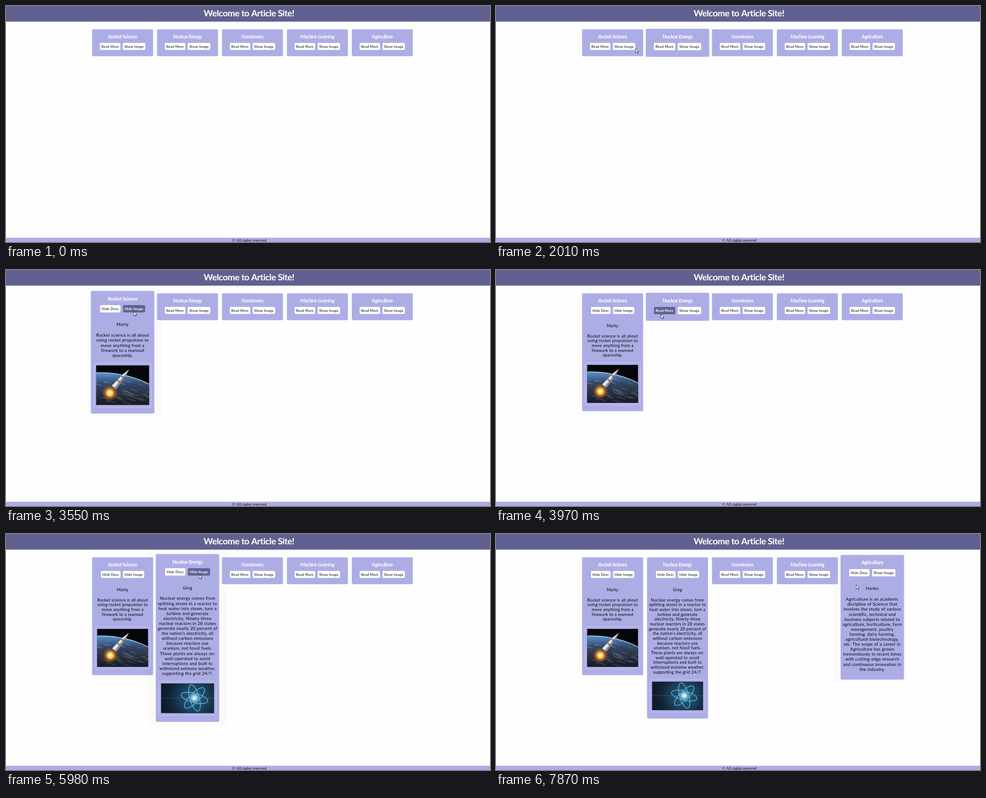
Animation of 1068x524 px, one loop 8000 ms. Source, as an HTML page with a canvas:

```html
<!DOCTYPE html>
<html lang="en">
<head>
<meta charset="utf-8">
<title>Article Site</title>
<style>
  html, body { margin: 0; width: 100%; height: 100%; overflow: hidden; background: #fefefe; }
  canvas { display: block; }
</style>
</head>
<body>
<canvas id="stage" width="1068" height="524"></canvas>
<script>
const ctx = document.getElementById('stage').getContext('2d');
const LOOP = 8000, TICK = 130;
const DARK = '#616191', LILAC = '#adade6';
const CARD_W = 134.6, CARD_Y = 51.7, CLOSED_H = 59.9, BUTTON_Y = 82, BUTTON_H = 15.6, GAP = 5.6;
const TEXT_Y = 149.7, LINE = 10.67;
const BODY = '9.1px Lato, sans-serif', SMALL = '7.5px Lato, sans-serif';

// desc and image are the moments at which each one opens
const cards = [
  { title: 'Rocket Science', desc: 2570, image: 3550, author: 'Marty', imageH: 84.5, paint: paintRocket,
    text: 'Rocket science is all about|using rocket propulsion to|move anything from a|firework to a manned|spaceship.' },
  { title: 'Nuclear Energy', desc: 4660, image: 5980, author: 'Greg', imageH: 63.5, paint: paintAtom,
    text: 'Nuclear energy comes from|splitting atoms in a reactor to|heat water into steam, turn a|turbine and generate|electricity. Ninety-three|nuclear reactors in 28 states|generate nearly 20 percent of|the nation’s electricity, all|without carbon emissions|because reactors use|uranium, not fossil fuels.|These plants are always on:|well-operated to avoid|interruptions and built to|withstand extreme weather,|supporting the grid 24/7.' },
  { title: 'Gemstones' },
  { title: 'Machine Learning' },
  { title: 'Agriculture', desc: 7140, author: 'Hanko',
    text: 'Agriculture is an academic|discipline of Science that|involves the study of various|scientific, technical and|business subjects related to|agriculture, horticulture, farm|management, poultry|farming, dairy farming,|agricultural biotechnology,|etc. The scope of a career in|Agriculture has grown|tremendously in recent times|with cutting-edge research|and continuous innovation in|the industry.' }
];
cards.forEach((card, i) => {
  card.x = 190 + i * 143.25;
  card.lines = (card.text || '').split('|');
  card.lastLine = TEXT_Y + (card.lines.length - 1) * LINE;
});

// Pointer trips: each eases to (x, y) along an arc that sags downwards
const entry = { x: 762, y: 3 };
const trips = [
  { start: 580, end: 2455, x: 233, y: 91, sag: 36 },
  { start: 2570, end: 2571, x: 233, y: 91, sag: 0 },
  { start: 3000, end: 3280, x: 282, y: 92, sag: 0 },
  { start: 3550, end: 3930, x: 364, y: 98, sag: 14 },
  { start: 4660, end: 5266, x: 426, y: 90, sag: 25 },
  { start: 5980, end: 6930, x: 800, y: 91, sag: 75 },
  { start: 7140, end: 7700, x: 795, y: 113, sag: 0 }
];

const clamp = v => Math.max(0, Math.min(1, v));
const smooth = k => k * k * (3 - 2 * k);
const random = n => Math.abs(Math.sin(n * 12.9898) * 43758.5453) % 1;
const tripAt = t => trips.findLastIndex(trip => trip.start <= t);

function snap(t) {
  const trip = trips[tripAt(t)];
  return trip ? trip.start + Math.floor((t - trip.start) / TICK) * TICK : 0;
}

function pointerAt(t) {
  const i = tripAt(t), trip = trips[i], from = trips[i - 1] || entry;
  if (!trip) return null;
  const k = smooth(clamp((t - trip.start) / (trip.end - trip.start)));
  return {
    x: from.x + (trip.x - from.x) * k,
    y: from.y + (trip.y - from.y) * k + trip.sag * Math.sin(Math.PI * k)
  };
}

const inside = (p, x, y, w, h) => p && p.x > x && p.x < x + w && p.y > y && p.y < y + h;

function cardHeight(card, t) {
  if (!(t >= card.desc)) return CLOSED_H;
  return card.lastLine + 18.8 - CARD_Y + (t >= card.image ? card.imageH + 17.8 : 0);
}

// Hover follows the pointer late and fades over a short window
function hoverAmount(card, t, delay = 95) {
  const samples = 10;
  let hits = 0;
  for (let i = 0; i < samples; i++) {
    const past = t - delay - i * 7;
    hits += inside(pointerAt(past), card.x, CARD_Y, CARD_W, cardHeight(card, past)) ? 1 : 0;
  }
  return hits / samples;
}

function box(x, y, w, h, color, radius = 0) {
  ctx.fillStyle = color;
  ctx.beginPath();
  ctx.roundRect(x, y, w, h, radius);
  ctx.fill();
}

function setFont(font, spacing) {
  ctx.font = font;
  ctx.letterSpacing = spacing + 'px';
}

function label(text, x, y, font, color, spacing = 0) {
  setFont(font, spacing);
  ctx.textAlign = 'center';
  ctx.fillStyle = color;
  ctx.fillText(text, x, y);
}

function polygon(points, color) {
  ctx.fillStyle = color;
  ctx.beginPath();
  points.forEach(([x, y]) => ctx.lineTo(x, y));
  ctx.closePath();
  ctx.fill();
}

function gradient(g, colors) {
  colors.forEach((c, i) => g.addColorStop(i / (colors.length - 1), c));
  return g;
}

function glow(x, y, r, ...colors) {
  ctx.fillStyle = gradient(ctx.createRadialGradient(x, y, 0, x, y, r), colors);
  ctx.fillRect(x - r, y - r, 2 * r, 2 * r);
}

function ellipse(x, y, rx, ry, angle, color, width) {
  ctx.beginPath();
  ctx.ellipse(x, y, rx, ry, angle, 0, 7);
  ctx.fillStyle = ctx.strokeStyle = color;
  ctx.lineWidth = width;
  width ? ctx.stroke() : ctx.fill();
}

function paintRocket(w, h) {
  box(0, 0, w, h, '#05060a');
  const earth = gradient(ctx.createLinearGradient(0, 16, 0, h), ['#5b93cc', '#33496c', '#29303f', '#151923']);
  ellipse(16, 176, 190, 160, .08, earth);
  ellipse(16, 176, 190, 160, .08, '#b4daf5', 1.4);
  for (let i = 1; i < 40; i++)
    ellipse(random(i) * w, 32 + random(i + 50) * 50, 3 + random(i + 90) * 8, 1.2, .3, 'rgba(165,178,198,.2)');
  glow(29, 59, 17, '#fff6c8', '#ffb53c', 'rgba(235,115,20,.5)', 'rgba(220,90,10,0)');
  ctx.save();
  ctx.translate(70, 9);
  ctx.rotate(.7);
  polygon([[0, 0], [3.2, 14], [6, 50], [-6, 50], [-3.2, 14]], '#e2e4e6');
  polygon([[0, 0], [3.2, 14], [6, 50], [1.5, 50]], '#858b94');
  box(-3.8, 20, 7.6, 2, '#5d4a42');
  box(-4.8, 32, 9.6, 3, '#a5683d');
  ctx.restore();
  glow(29, 59, 9, '#fffef0', 'rgba(255,225,120,.9)', 'rgba(255,180,50,0)');
}

function paintAtom(w, h) {
  box(0, 0, w, h, '#0d1a28');
  glow(70, 31, 75, '#2a6688', '#17364d', 'rgba(13,26,40,0)');
  box(0, 31, w, .7, 'rgba(90,180,220,.4)');
  for (let i = 0; i < 3; i++) {
    const angle = .25 + i * Math.PI / 3;
    ellipse(71, 31, 29, 10, angle, 'rgba(70,165,225,.4)', 2.4);
    ellipse(71, 31, 29, 10, angle, '#86cdf2', .9);
  }
  glow(71, 31, 12, '#fff', 'rgba(180,235,255,.75)', 'rgba(90,180,230,0)');
}

function drawImage(card, y) {
  const w = 112.5, h = card.imageH;
  ctx.save();
  ctx.translate(card.x + 11.1, y);
  ctx.beginPath();
  ctx.roundRect(-4.6, -4.5, w + 9.3, h + 9, 3);
  ctx.strokeStyle = '#d3d3f3';
  ctx.lineWidth = .8;
  ctx.stroke();
  ctx.beginPath();
  ctx.rect(0, 0, w, h);
  ctx.clip();
  card.paint(w, h);
  ctx.restore();
}

function drawButtons(names, cx, pointer) {
  setFont(SMALL, .3);
  const widths = names.map(name => ctx.measureText(name).width + 6.4);
  let x = cx - (widths[0] + GAP + widths[1]) / 2;
  names.forEach((name, i) => {
    const w = widths[i], active = inside(pointer, x, BUTTON_Y, w, BUTTON_H);
    box(x, BUTTON_Y, w, BUTTON_H, active ? DARK : '#fff', 2);
    label(name, x + w / 2, 92.8, (active ? 'bold ' : '') + SMALL, active ? '#fff' : '#000', active ? .15 : .3);
    x += w + GAP;
  });
}

function drawShadow(card, i, t) {
  const alpha = Math.min(hoverAmount(card, t), hoverAmount(card, t, 265));
  const w = CARD_W * 1.04, h = cardHeight(card, t);
  const left = i ? 17 : 5, right = i < cards.length - 1 ? 17 : 5;
  box(card.x + (CARD_W - w) / 2 - left, CARD_Y - h * .02 - 5, w + left + right, h * 1.04 + 11, `rgba(0,0,0,${.017 * alpha})`, 4);
}

function drawCard(card, t, pointer) {
  const open = t >= card.desc, image = t >= card.image;
  const h = cardHeight(card, t), hover = hoverAmount(card, t), scale = 1 + .04 * hover;
  const cx = card.x + CARD_W / 2, cy = CARD_Y + h / 2;
  const local = hover > .5 && pointer && { x: cx + (pointer.x - cx) / scale, y: cy + (pointer.y - cy) / scale };
  ctx.save();
  ctx.translate(cx, cy);
  ctx.scale(scale, scale);
  ctx.translate(-cx, -cy);
  box(card.x, CARD_Y, CARD_W, h, LILAC, 3);
  label(card.title, cx, 72, 'bold 10.6px Lato, sans-serif', '#fff', -.57);
  drawButtons([open ? 'Hide Desc' : 'Read More', image ? 'Hide Image' : 'Show Image'], cx, local);
  if (open) {
    label(card.author, cx, 126.7, BODY, '#000', .3);
    card.lines.forEach((line, i) => label(line, cx, TEXT_Y + i * LINE, BODY, '#000', .3));
  }
  if (image) drawImage(card, card.lastLine + 18.1);
  ctx.restore();
}

function drawPointer({ x, y }) {
  ctx.save();
  ctx.translate(x, y);
  ctx.scale(.57, .57);
  polygon([[0, 0], [0, 17], [4, 13.3], [6.7, 19], [9.4, 17.8], [6.8, 12.2], [12, 12]], '#fff');
  ctx.strokeStyle = '#000';
  ctx.lineWidth = 1.3;
  ctx.stroke();
  ctx.restore();
}

function draw(now) {
  const t = snap(now % LOOP), pointer = pointerAt(t);
  box(0, 0, 1068, 524, '#fefefe');
  box(0, 0, 1068, 34.8, DARK);
  label('Welcome to Article Site!', 536, 23, 'bold 19.8px Lato, sans-serif', '#fff', -.57);
  box(0, 514.5, 1068, 9.5, LILAC);
  label('© All rights reserved', 536.8, 522.5, '9px "Liberation Serif", serif', '#000');
  cards.forEach((card, i) => drawShadow(card, i, t));
  cards.forEach(card => drawCard(card, t, pointer));
  if (pointer) drawPointer(pointer);
  requestAnimationFrame(draw);
}
requestAnimationFrame(draw);
</script>
</body>
</html>
```
